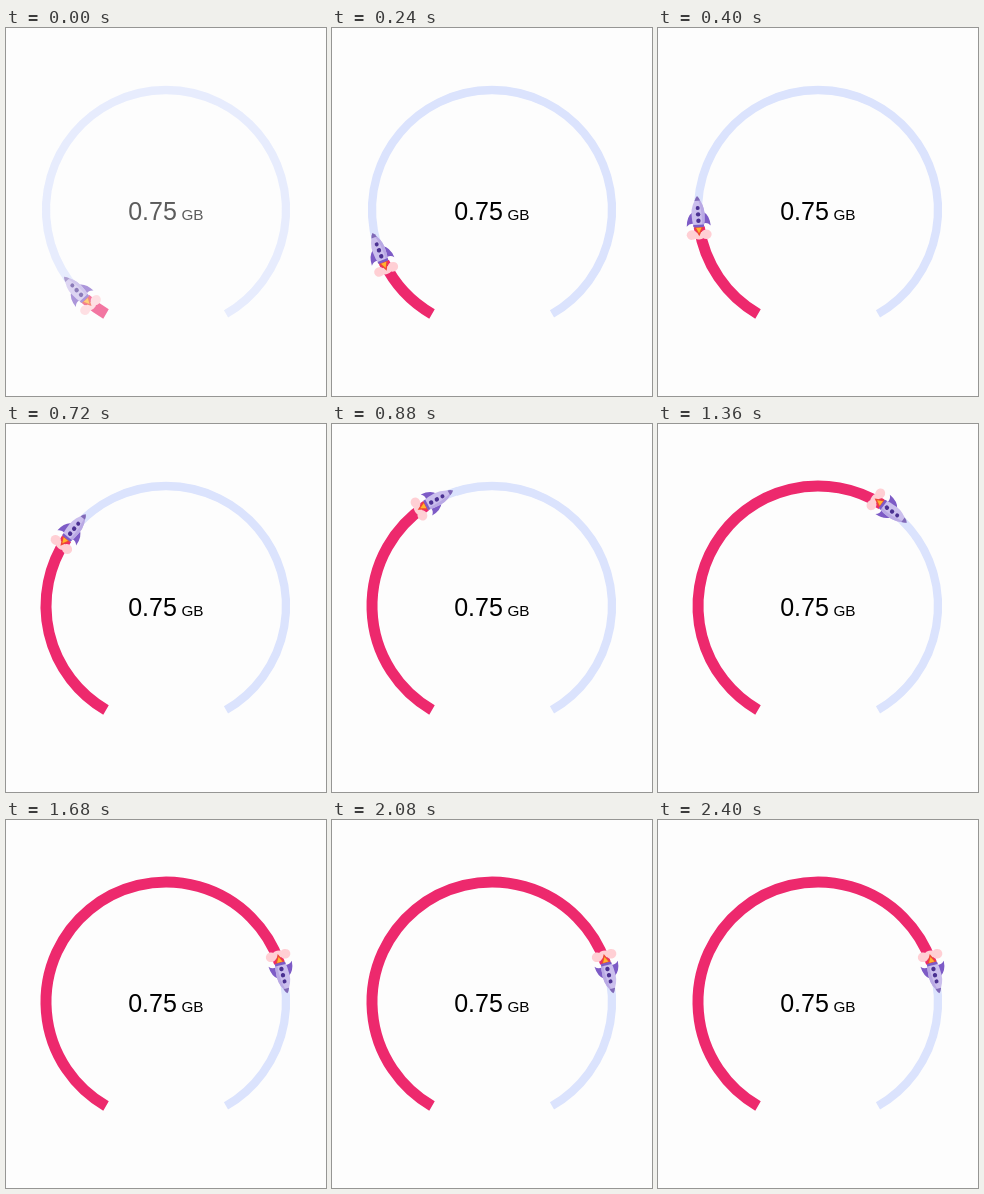
Recreate the animation shown at these times as an HTML page. Size 320 px wide and 368 px high, loop 2.8 s.

```html
<!DOCTYPE html>
<html lang="en">
<head>
<meta charset="utf-8">
<title>Data gauge</title>
<style>
  html, body { margin: 0; width: 100%; height: 100%; overflow: hidden; background: #fdfdfd; }
  svg { display: block; width: 100%; height: 100%; }
  text { font-family: "Liberation Sans", Arial, sans-serif; font-size: 25px; }
</style>
</head>
<body>
<svg viewBox="0 0 320 368">
  <g id="gauge">
    <path id="track" fill="none" stroke="#dbe3fd" stroke-width="8.3"/>
    <path id="bar" fill="none" stroke="#ed296d" stroke-width="11"/>
    <g id="rocket">
      <g fill="#ffcfd4">
        <ellipse cx="-7.2" cy="18" rx="5.3" ry="4.8"/>
        <ellipse cx="7.2" cy="18" rx="5.3" ry="4.8"/>
        <ellipse cy="19" rx="6" ry="3.8"/>
      </g>
      <path d="M-5.5 9H5.5L0 19.5Z" fill="#ee4836"/>
      <path d="M-2.8 11H2.8L0 16.5Z" fill="#ffb52e"/>
      <path id="fin" d="M-5-5Q-11.5-1-12 9.5Q-9 6-5 7Z" fill="#7d5bc6"/>
      <use href="#fin" transform="scale(-1 1)"/>
      <path d="M0-20Q-6.5-12-6.5-3Q-6.5 5-5 10H5Q6.5 5 6.5-3Q6.5-12 0-20Z" fill="#cbbfed"/>
      <path d="M0-20Q6.5-12 6.5-3Q6.5 5 5 10H3Q5-6 0-20Z" fill="#b9a9e4"/>
      <path d="M0-20.8Q-2-19-2.8-16H2.8Q2-19 0-20.8Z" fill="#8069b8"/>
      <path d="M-5.5 8H5.5L5 10.5H-5Z" fill="#7d5bc6"/>
      <g fill="#4b3192">
        <circle cy="-8.7" r="2"/>
        <circle cy="-2.3" r="2.2"/>
        <circle cy="4.1" r="2.2"/>
      </g>
    </g>
    <text x="122.2" y="192">0.75<tspan dx="4.6" dy="-.3" font-size="15.3">GB</tspan></text>
  </g>
</svg>
<script>
const LOOP = 2800, STEP = 80;
const CX = 160, CY = 182, R = 120, START = -150, END = 150;
// time (ms), heading (degrees clockwise from top), speed (degrees per ms)
const KEYS = [
  [0, -133, 0.085],
  [400, -93.2, 0.118],
  [720, -51, 0.137],
  [1040, -6, 0.136],
  [1360, 37, 0.128],
  [1680, 76, 0.118]
];
const $ = id => document.getElementById(id);

function point(deg) {
  const a = deg * Math.PI / 180;
  return [CX + R * Math.sin(a), CY - R * Math.cos(a)].map(v => v.toFixed(2));
}

function arc(from, to) {
  const large = to - from > 180 ? 1 : 0;
  return `M${point(from)}A${R} ${R} 0 ${large} 1 ${point(to)}`;
}

function heading(t) {
  const i = KEYS.findIndex(k => k[0] > t);
  if (i < 0) return KEYS[KEYS.length - 1][1];
  const [t0, a0, v0] = KEYS[i - 1], [t1, a1, v1] = KEYS[i];
  const d = t1 - t0, u = (t - t0) / d, w = 1 - u;
  return w * w * (1 + 2 * u) * a0 + u * u * (3 - 2 * u) * a1
    + d * u * w * (w * v0 - u * v1);
}

function draw(time) {
  const t = Math.floor(time % LOOP / STEP) * STEP;
  const a = heading(t);
  $("gauge").setAttribute("opacity", Math.min(1, 0.63 + t / 320));
  $("bar").setAttribute("d", arc(START, a - 5));
  $("rocket").setAttribute("transform", `translate(${point(a)}) rotate(${a + 90})`);
}

function tick() {
  draw(performance.now() - began);
  requestAnimationFrame(tick);
}

$("track").setAttribute("d", arc(START, END));
const began = performance.now();
tick();
</script>
</body>
</html>
```
